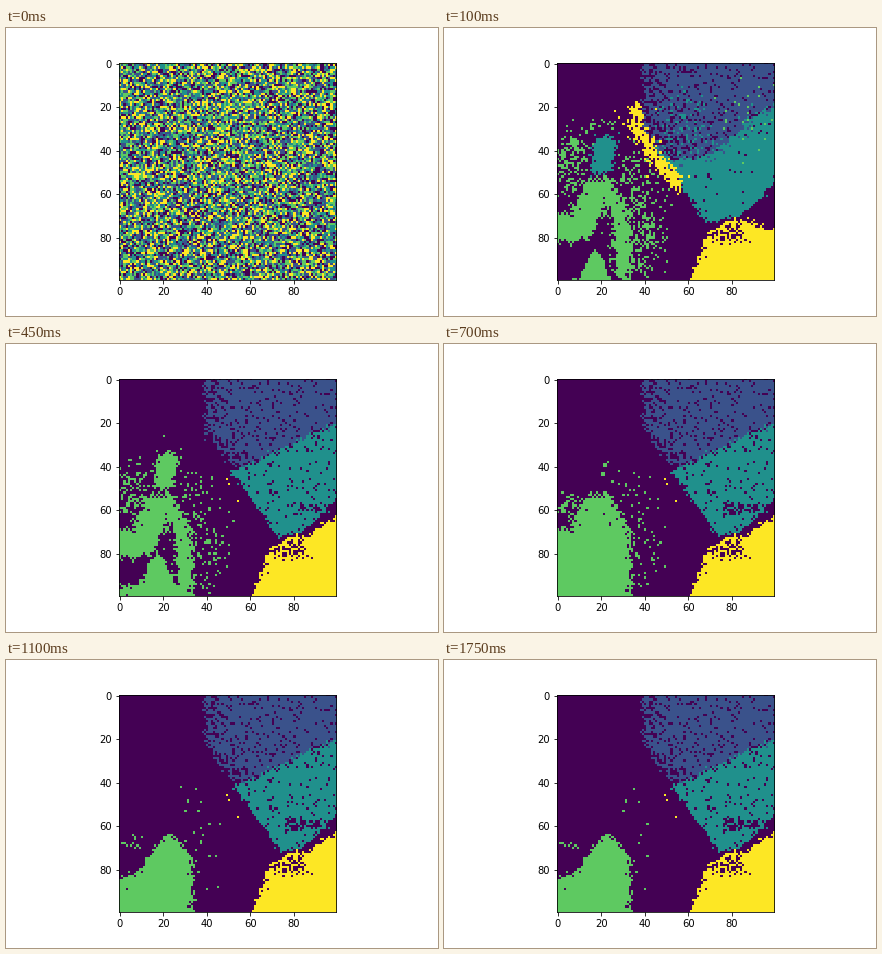
These frames come from a looping animation (432x288 px, 1.85 s). A matplotlib script:

```python
import numpy as np
import matplotlib.pyplot as plt
from matplotlib.animation import FuncAnimation

N, FRAMES, STEP = 100, 37, 50
PURPLE, BLUE, TEAL, GREEN, YELLOW = range(5)

rng = np.random.default_rng(7)
Y, X = np.mgrid[0:N, 0:N].astype(float)


def stroke(radius, *pts):
    """Depth inside a thick line through the points."""
    dist = np.full((N, N), np.inf)
    for (ax, ay), (bx, by) in zip(pts, pts[1:]):
        dx, dy = bx - ax, by - ay
        k = np.clip(((X - ax) * dx + (Y - ay) * dy) / (dx * dx + dy * dy), 0, 1)
        dist = np.minimum(dist, np.hypot(X - ax - k * dx, Y - ay - k * dy))
    return radius - dist


def blob(cx, cy, rx, ry):
    return np.exp(-(((X - cx) / rx) ** 2 + ((Y - cy) / ry) ** 2) ** 2)


def decay(t, tau):
    return np.exp(-(t - 2) / tau)


def ease(t, a, b):
    k = np.clip((t - a) / (b - a), 0, 1)
    return k * k * (3 - 2 * k)


def mix(a, b, k):
    return a + (b - a) * k


start = rng.integers(0, 5, (N, N))
grain = rng.laplace(size=(N, N))
wave = sum(np.roll(rng.normal(size=(N, N)), s, ax)
           for s in (-1, 0, 1) for ax in (0, 1)) / 3
edge = 0.7 * grain + 0.4 * wave
pit, dust, flip = rng.random((3, N, N))

ARM = stroke(6.5, (-9, 76.5), (10, 75), (18, 59))
LEG = stroke(3.5, (21, 56), (29, 70), (30, 96))
HEAD = stroke(5, (22, 38), (20, 46))
BAND = stroke(3, (36, 21), (36, 30), (43, 42), (55, 55))
SUN_PITS = 0.6 * blob(78, 78, 8, 5)
SEA_PITS = 0.6 * (blob(80, 59, 5, 4) + blob(90, 60, 3, 3))


def sky_fields(t):
    """Depth from the left border, from the floor, and the blue/teal line."""
    left = 38 + 0.72 * np.maximum(0, Y - 22 - 9 * decay(t, 5))
    floor = 73 - 0.025 * np.maximum(0, X - 72) ** 2
    hump = 8 * np.sin(np.clip((X - 48) / 13, -1.2, np.pi))
    split = np.minimum(41, 41 - 0.46 * (X - 54)) + hump * decay(t, 2)
    return X - left, floor - Y, split


def sun_depth(t):
    slope = 0.7 - 1.1 * decay(t, 1.2)
    top = 72 + 0.6 * np.maximum(0, 78 - X) - slope * np.maximum(0, X - 86)
    return np.minimum(X - 61 - 0.37 * (99 - Y), Y - top)


def green_depth(t):
    """An arch that fills from below, then sinks into a mound."""
    rise, sink = ease(t, 7, 14), ease(t, 14, 22)
    limbs = np.maximum(ARM, LEG) - 30 * sink
    peak = np.exp(-((X - mix(17, 23, sink)) / mix(6, 11, sink)) ** 2)
    ridge = mix(70, 84, sink) - mix(16, 20, sink) * peak + 32 * (1 - rise)
    return np.maximum(limbs, np.minimum(Y - ridge, 33 - X))


def green_dust(t):
    k = ease(t, 0, 24)
    left = mix(0.45, 0.35, k) * blob(6, mix(45, 68, k), mix(9, 5, k), mix(15, 3, k))
    right = 0.36 * decay(t, 9) * blob(36, 71, 12, 27)
    crown = 0.15 * decay(t, 6) * blob(20, 29, 8, 4)
    return left + right + crown


def labels(frame):
    if frame == 0:
        return start
    t = max(frame, 2)
    early = decay(t, 1.5)
    lab = np.full((N, N), PURPLE)

    side, floor, split = sky_fields(t)
    sky = np.minimum(side, floor) + edge > 0
    blue = Y < split + (0.6 + early) * grain
    blue_pits = 0.11 + 0.5 * np.exp(-np.maximum(side, 0) / (6 + 3 * early))
    sea_pits = 0.07 - 0.05 * early + SEA_PITS * ease(t, 3, 16)
    solid = sky & (pit > np.where(blue, blue_pits, sea_pits))
    lab[solid] = np.where(blue, BLUE, TEAL)[solid]
    lab[solid & (dust < 0.18 * early * blob(55, 32, 14, 18))] = TEAL
    lab[solid & (dust > 1 - 0.04 * early * blob(88, 22, 14, 18))] = GREEN

    lab[BAND + 1.3 * grain > 0.8 + 6 * (1 - early)] = YELLOW
    lab[(sun_depth(t) + edge > 0) & (pit > SUN_PITS)] = YELLOW

    green = (green_depth(t) + 1.2 * edge > 0) | (dust < green_dust(t))
    lab[green & (X < 55) & (lab == PURPLE)] = GREEN
    head = HEAD + edge > 10 * ease(t, 8, 20)
    lab[head] = TEAL if t < 4 else GREEN

    return np.where(flip < 0.12, start, lab) if frame == 1 else lab


fig = plt.figure(figsize=(6, 4), dpi=72, facecolor="white")
fig.subplots_adjust(left=0.125, right=0.9, bottom=0.125, top=0.88)
ax = fig.add_subplot()
image = ax.imshow(start, cmap="viridis", vmin=0, vmax=4, interpolation="nearest")


def update(frame):
    image.set_data(labels(frame))
    return [image]


anim = FuncAnimation(fig, update, frames=FRAMES, interval=STEP, repeat=True,
                     repeat_delay=0, blit=False)
plt.show()
```
